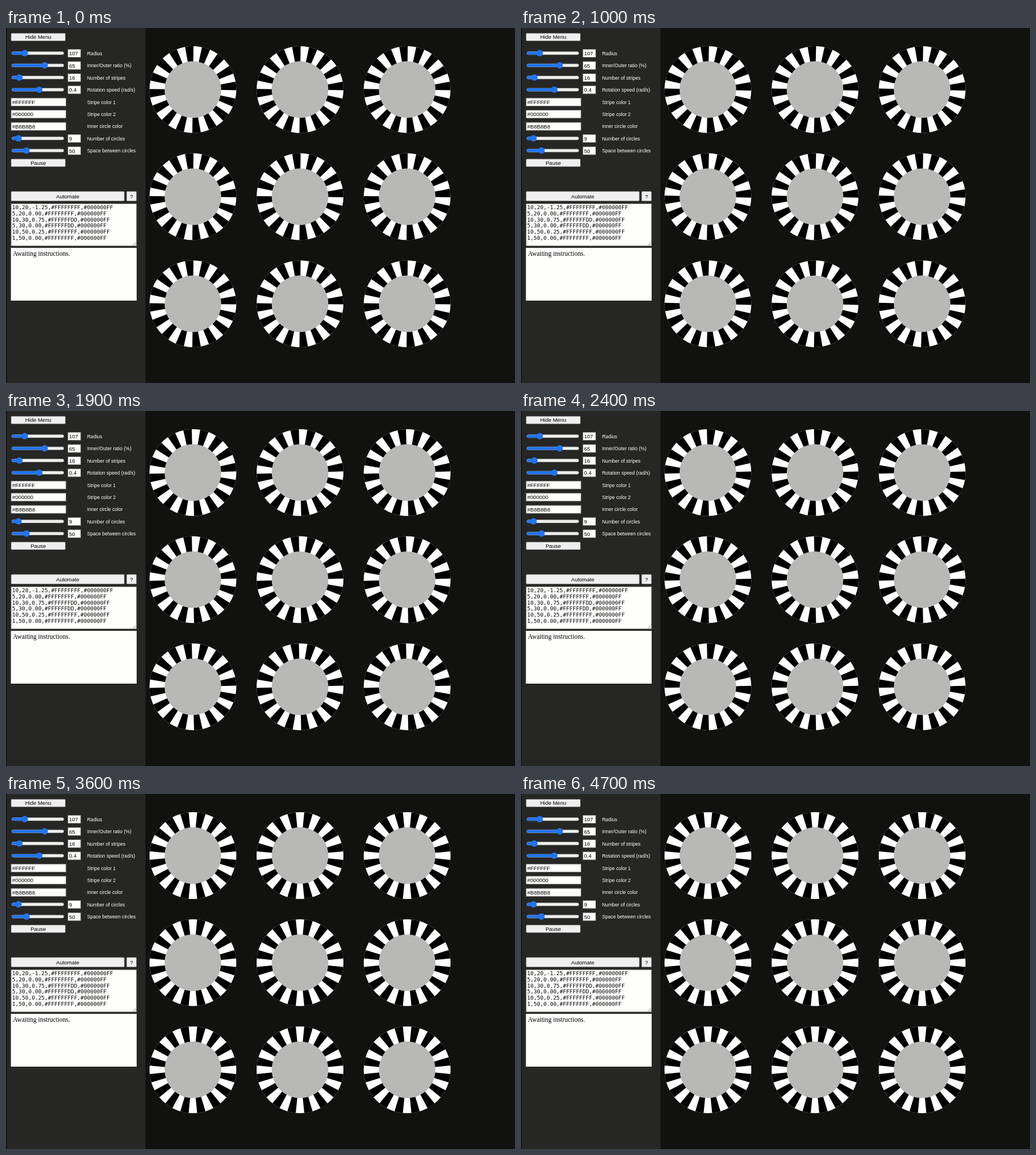
An HTML page that plays this animation: 896 by 625 pixels, repeating every 4800 ms.

```html
<!DOCTYPE html>
<html lang="en">
<head>
<meta charset="utf-8">
<title>Rotating stripes</title>
<style>
html, body { margin: 0; width: 100%; height: 100%; overflow: hidden; background: #11110f; }
svg { display: block; }
text { font: 9.52px "Liberation Sans", Arial, sans-serif; fill: #000; white-space: pre; }
.label { font-size: 8.57px; fill: #fff; }
.code { font-family: "DejaVu Sans Mono", monospace; }
.status { font: 11.43px "Liberation Serif", Times, serif; }
.button { fill: #efefef; stroke: #767676; stroke-width: .7; }
.field { fill: #fefefd; stroke: #767676; stroke-width: .9; }
.mid { text-anchor: middle; }
</style>
</head>
<body>
<svg id="stage" width="896" height="625" viewBox="0 0 896 625">
  <defs>
    <g id="wheel">
      <circle r="76.4" fill="#fff"/>
      <circle r="61.4" fill="none" stroke="#000" stroke-width="30" pathLength="32" stroke-dasharray="1 1"/>
      <circle r="49.8" fill="#b8b8b7"/>
    </g>
  </defs>
  <rect x="1.5" width="244" height="625" fill="#262624"/>
</svg>
<script>
const stage = document.getElementById('stage');

function add(tag, attrs, text = '') {
  const el = document.createElementNS('http://www.w3.org/2000/svg', tag);
  for (const name in attrs) el.setAttribute(name, attrs[name]);
  el.textContent = text;
  stage.append(el);
  return el;
}
const write = (x, y, text, cls = '') => add('text', { x, y, class: cls }, text);
const box = (x, y, width, height, cls) =>
  add('rect', { x, y, width, height, class: cls, rx: cls === 'button' ? 1.4 : 0 });

function button(x, y, w, h, text) {
  box(x, y, w, h, 'button');
  write(x + w / 2, y + h / 2 + 3.4, text, 'mid');
}

function slider(x, y) {
  const track = { x: 10.3, y: y - 2.6, height: 5.2, rx: 2.6 };
  add('rect', { ...track, width: 91.4, fill: '#efefef', stroke: '#b2b2b2', 'stroke-width': .6 });
  add('rect', { ...track, width: x - 10.3, fill: '#2074f0' });
  add('circle', { cx: x, cy: y, r: 5.7, fill: '#2074f0' });
}

button(9, 9.3, 95.5, 13.4, 'Hide Menu');

// label, value, slider thumb (text field when absent)
[
  ['Radius', '107', 33],
  ['Inner/Outer ratio (%)', '65', 68],
  ['Number of stripes', '16', 23.5],
  ['Rotation speed (rad/s)', '0.4', 58.5],
  ['Stripe color 1', '#FFFFFF'],
  ['Stripe color 2', '#000000'],
  ['Inner circle color', '#B8B8B8'],
  ['Number of circles', '9', 22],
  ['Space between circles', '50', 36]
].forEach(([label, value, thumb], i) => {
  const y = 44.5 + i * 21.43;
  if (thumb) {
    slider(thumb, y - .2);
    box(109, y - 6.9, 22.6, 14, 'field');
  } else {
    box(9, y - 6.9, 96.7, 14, 'field');
  }
  write(thumb ? 111 : 11, y + 3.6, value);
  write(142.7, y + 3.4, label, 'label');
});

button(9, 230.7, 95.5, 13.4, 'Pause');
button(9, 287.8, 199.3, 16.8, 'Automate');
button(212.3, 287.8, 17.4, 16.8, '?');

box(9, 309.3, 220.8, 74.4, 'field');
[
  '10,20,-1.25,#FFFFFFFF,#000000FF',
  '5,20,0.00,#FFFFFFFF,#000000FF',
  '10,30,0.75,#FFFFFFDD,#000000FF',
  '5,30,0.00,#FFFFFFDD,#000000FF',
  '10,50,0.25,#FFFFFFFF,#000000FF',
  '1,50,0.00,#FFFFFFFF,#000000FF'
].forEach((line, i) => write(10.8, 319.3 + i * 10.71, line, 'code'));
add('path', { d: 'M223.5 382.5l5-5M226.5 382.5l2-2', stroke: '#555', 'stroke-width': .7 });

add('rect', { x: 8.6, y: 387, width: 221.4, height: 93, fill: '#fefefd' });
write(12.2, 401, 'Awaiting instructions.', 'status');

const wheels = [];
for (let i = 0; i < 9; i++) {
  const x = 329 + i % 3 * 188.57, y = 108.4 + Math.floor(i / 3) * 188.57;
  wheels.push({ x, y, el: add('use', { href: '#wheel' }) });
}

// [step of 100 ms, degrees]: uneven turning with one stall
const turns = [[0, .8], [10, 23.9], [15, 34.3], [24, 54.9], [31, 70.4],
  [33, 75], [34, 75], [36, 84.4], [47, 106.9]];

function angleAt(step) {
  const i = Math.max(1, turns.findIndex(([s]) => s >= step));
  const [s0, a0] = turns[i - 1], [s1, a1] = turns[i];
  return a0 + (a1 - a0) * (step - s0) / (s1 - s0);
}

function draw(now) {
  const angle = angleAt(Math.floor(now % 4800 / 100)) - 11.25;
  for (const { x, y, el } of wheels)
    el.setAttribute('transform', `translate(${x} ${y}) rotate(${angle})`);
  requestAnimationFrame(draw);
}
draw(performance.now());
</script>
</body>
</html>
```
